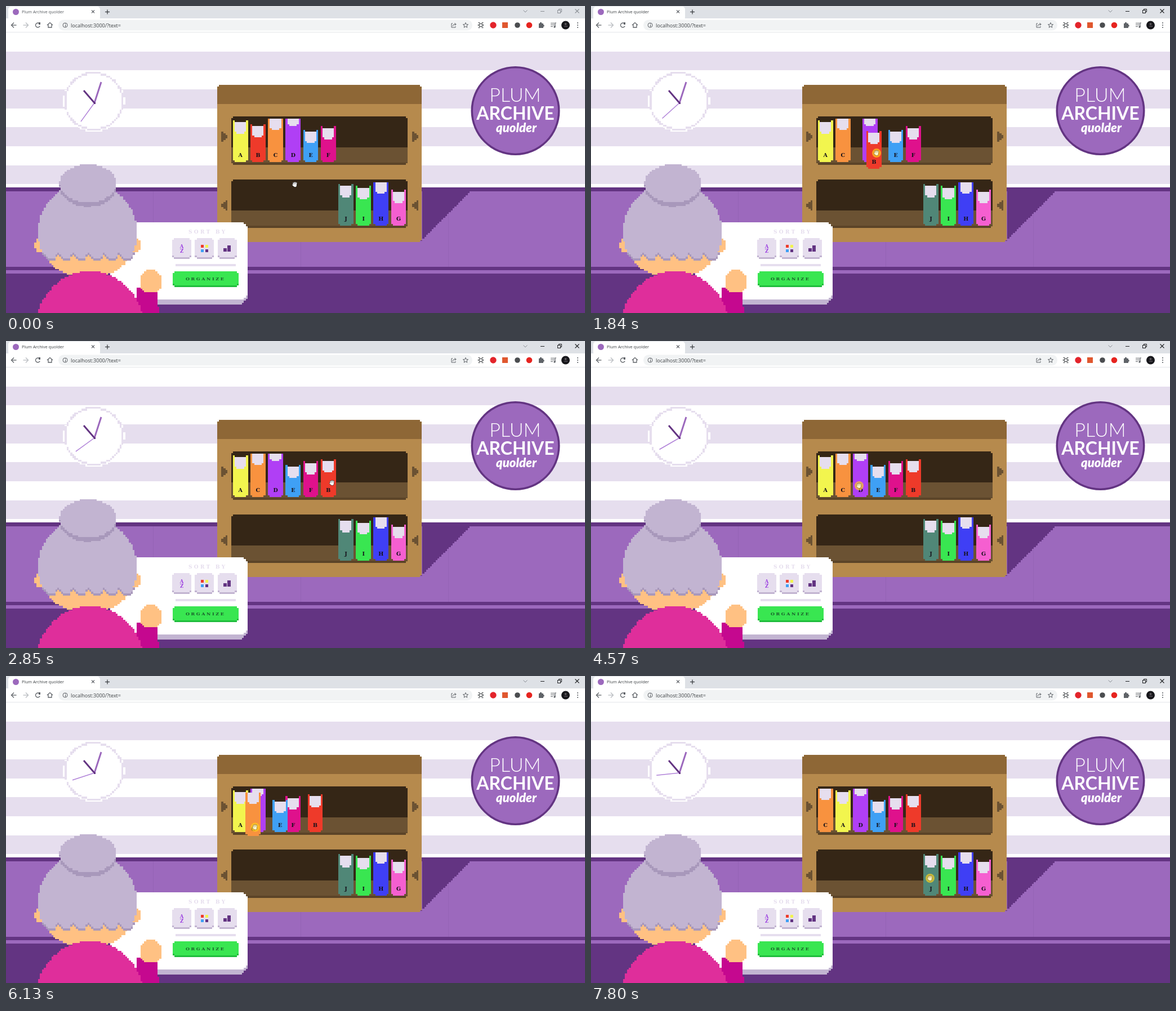
These frames come from a looping animation (1028 px wide and 545 px high, 8000 ms). An HTML page with a canvas:

```html
<!DOCTYPE html>
<html lang="en">
<head>
<meta charset="utf-8">
<title>Plum Archive quolder</title>
<style>
html, body { margin: 0; width: 100%; height: 100%; overflow: hidden; background: #fff; }
canvas { display: block; }
</style>
</head>
<body>
<canvas id="stage" width="1028" height="545"></canvas>
<script>
const LOOP = 8000, U = 3.36, PITCH = 31.2, TAU = Math.PI * 2;
const DARK = '#633482', PURPLE = '#9c69bd', LILAC = '#e6deee', GREY = '#c2b4d1', SHADE = '#a898bb', SKIN = '#ffc183';
const INK = '#5f6368', BLACK = '#33363a';
const SLAB = '"DejaVu Serif", serif', UI = '"Open Sans", sans-serif';

const stage = document.getElementById('stage').getContext('2d');
const backdrop = document.createElement('canvas');
backdrop.width = 1028;
backdrop.height = 545;
let g = backdrop.getContext('2d');

// ---- drawing helpers ----
function rect(x, y, w, h, color) {
  const l = Math.round(x), t = Math.round(y);
  g.fillStyle = color;
  g.fillRect(l, t, Math.round(x + w) - l, Math.round(y + h) - t);
}
function stepped(x, y, w, h, color, steps = 1) {
  for (let i = 0; i <= steps; i++) {
    const dx = i * U, dy = (steps - i) * U;
    rect(x + dx, y + dy, w - 2 * dx, h - 2 * dy, color);
  }
}
function rows(y0, y1, span, color) {
  const snap = v => Math.round(v / U) * U;
  for (let y = y0; y < y1 - 0.1; y += U) {
    const [l, r] = span(y + U / 2).map(snap);
    rect(l, y, r - l, Math.min(U, y1 - y), color);
  }
}
function oval(cx, cy, rx, ry, color, bottom = cy + ry) {
  rows(cy - ry, bottom, y => {
    const d = rx * Math.sqrt(Math.max(0, 1 - ((y - cy) / ry) ** 2));
    return [cx - d, cx + d];
  }, color);
}
function line(color, width, ...pts) {
  g.strokeStyle = color;
  g.lineWidth = width;
  g.beginPath();
  pts.forEach(([x, y]) => g.lineTo(x, y));
  g.stroke();
}
function frameBox(x, y, size, color) {
  g.strokeStyle = color;
  g.lineWidth = 1;
  g.strokeRect(x, y, size, size);
}
function cross(x, y, r, color) {
  line(color, 1.1, [x - r, y - r], [x + r, y + r]);
  line(color, 1.1, [x + r, y - r], [x - r, y + r]);
}
function disc(x, y, r, color) {
  g.fillStyle = color;
  g.beginPath();
  g.arc(x, y, r, 0, TAU);
  g.fill();
}
function arc(x, y, r, a, b, color, width) {
  g.strokeStyle = color;
  g.lineWidth = width;
  g.beginPath();
  g.arc(x, y, r, a, b);
  g.stroke();
}
function pill(x, y, w, h, r, color) {
  g.fillStyle = color;
  g.beginPath();
  g.roundRect(x, y, w, h, r);
  g.fill();
}
function text(s, x, y, font, color, align = 'left', spacing = 0) {
  g.font = font;
  g.fillStyle = color;
  g.textAlign = align;
  g.letterSpacing = spacing + 'px';
  g.fillText(s, x, y);
  g.letterSpacing = '0px';
}

// ---- timing helpers ----
const clamp = p => Math.max(0, Math.min(1, p));
const smooth = p => p * p * (3 - 2 * p);
const ramp = (t, from, duration) => clamp((t - from) / duration);

// ---- static scene ----
function room() {
  const stripe = 33.65;
  rect(0, 46, 1028, 499, '#fff');
  for (let i = 1; i < 8; i += 2) rect(0, 47 + i * stripe, 1028, stripe, LILAC);
  rect(0, 322, 1028, 223, DARK);
  rect(0, 329, 1028, 134, PURPLE);
  rect(0, 469, 1028, 6, PURPLE);
  for (let x = 261; x < 800; x += 262) rect(x, 329, 1, 134, '#9463b5');
  rows(329, 417, y => [738, 738 + 417 - y], DARK);
}

function clockFace() {
  oval(156, 169, 54.5, 54, '#fff');
  oval(156, 169, 53, 52, LILAC);
  oval(156, 169, 50, 48.7, '#fff');
  line(PURPLE, 3, [157, 172], [169, 135]);
  line(DARK, 3, [157, 172], [138, 150]);
}

function arrow(x, y, dir) {
  for (let i = 0; i < 3; i++) {
    const h = 18 - i * 6;
    rect(x + dir * (i - 1) * 3.6, y - h / 2, 3.6, h, '#6b5233');
  }
}

function bookcase() {
  const wood = '#b68a4d';
  stepped(375, 140, 363, 279, wood);
  stepped(375, 140, 363, 37, '#8e6736');
  rect(378, 174, 357, 4, wood);
  for (const y of [196, 308]) {
    stepped(400, y, 313, 86, '#5b4428');
    stepped(400, y, 313, 60, '#352616');
    rect(400, y + 55, 313, 27, '#6b5233');
  }
  for (const x of [386, 725]) {
    arrow(x, 232, 1);
    arrow(x, 354, -1);
  }
}

function sign() {
  disc(904.5, 186, 79, DARK);
  disc(904.5, 186, 75.5, PURPLE);
  text('PLUM', 904, 170, '300 34px Lato, sans-serif', '#fff', 'center');
  text('ARCHIVE', 904.5, 202, 'bold 32px Lato, sans-serif', '#fff', 'center');
  text('quolder', 906, 224, 'italic 900 22px Lato, sans-serif', '#fff', 'center');
}

function panel() {
  stepped(185, 390, 244, 140, GREY, 3);
  stepped(185, 384, 244, 137, '#fff', 2);
  text('SORT BY', 324, 403.5, 'bold 9px ' + SLAB, LILAC, 'left', 3.3);
  for (let i = 0; i < 3; i++) {
    stepped(295 + i * 40.3, 415, 34, 34, GREY);
    stepped(295 + i * 40.3, 412, 34, 34, LILAC);
  }
  [...'AZ'].forEach((c, i) => text(c, 312, 430 + 8 * i, 'bold 8.5px ' + SLAB, '#9b3fe0', 'center'));
  ['#ee3a2a', '#f2f54e', '#3fa0f5', DARK].forEach((c, i) =>
    rect(345.5 + 8 * (i % 2), 424 + 8 * (i >> 1), 5, 5, c));
  rect(386, 430, 6, 6, DARK);
  rect(393, 425, 6, 11, DARK);
  rect(301, 458, 107, 3.5, LILAC);
  stepped(296, 474, 117, 25, '#20bd3d');
  stepped(296, 471, 117, 25, '#39e651');
  text('ORGANIZE', 319, 486.5, 'bold 8px ' + SLAB, '#1a5a2a', 'left', 2.6);
}

function librarian() {
  for (const x of [60, 231]) oval(x, 425, 9, 12, SKIN);
  oval(145.5, 437, 74, 44, SKIN);
  oval(145, 402, 88, 88, GREY, 440);
  for (let x = 64; x < 226; x += U) {
    const wave = Math.abs(Math.sin(Math.PI * (x - 64) / 27));
    const hem = 442 + Math.round(3.5 * wave) * U;
    rect(x, 437, U, hem - 437, SHADE);
    rect(x, 437, U, hem - 441, GREY);
  }
  oval(145.5, 319, 50, 38, SHADE);
  oval(145.5, 315, 50, 34, GREY);
  rows(500, 545, y => [233, 267 + (y - 500) / 10], '#c5088f');
  oval(149, 572, 96, 101, '#df2e9b', 545);
  oval(257, 489, 20, 21, SKIN);
}

function browserArrow(x, dir, color) {
  line(color, 1.3, [x - 4.5, 34], [x + 4.5, 34]);
  line(color, 1.3, [x, 29.5], [x - 4.5 * dir, 34], [x, 38.5]);
}

function star(cx, cy) {
  const pts = Array.from({ length: 11 }, (_, i) => {
    const a = i * Math.PI / 5 - Math.PI / 2, r = i % 2 ? 2.1 : 4.8;
    return [cx + r * Math.cos(a), cy + r * Math.sin(a)];
  });
  line(INK, 1, ...pts);
}

function addressBar() {
  browserArrow(14, 1, INK);
  browserArrow(35, -1, '#b9bcc0');
  arc(56.5, 34, 4, 0.4, 5.4, INK, 1.3);
  rect(58, 29, 3, 4, INK);
  line(INK, 1.3, [73, 34], [78, 29.5], [83, 34]);
  line(INK, 1.3, [75, 33], [75, 38], [81, 38], [81, 33]);
  pill(93, 24.5, 735, 19, 9.5, '#f1f3f4');
  arc(105, 34, 4, 0, TAU, INK, 1);
  rect(104.5, 33, 1, 4, INK);
  rect(104.5, 31, 1, 1, INK);
  text('localhost:3000/?text=', 115, 37.5, '9px ' + UI, '#3c4043');
  line(INK, 1, [793, 31], [791, 31], [791, 38], [798, 38], [798, 36]);
  line(INK, 1, [793, 36], [795, 32.5], [799, 32.5]);
  line(INK, 1, [796.5, 30], [799, 32.5], [796.5, 35]);
  star(816, 34.3);
}

function extensions() {
  g.setLineDash([3, 3]);
  frameBox(838.5, 29.5, 9, BLACK);
  g.setLineDash([]);
  frameBox(840.5, 31.5, 5, BLACK);
  disc(865, 34, 5.7, '#e3242b');
  rect(881, 29, 10, 10, '#e0572f');
  disc(908, 34, 4.8, '#4b4d50');
  disc(929, 34, 5.3, '#e62420');
  rect(946, 31, 8, 8, INK);
  disc(949.5, 30.5, 1.8, INK);
  disc(954, 35, 1.8, INK);
  for (let i = 0; i < 3; i++) {
    rect(967, 30 + 3 * i, i < 2 ? 7 : 4, 1, INK);
    disc(1015, 30 + 4 * i, 1.1, INK);
  }
  line(INK, 1.2, [977, 30], [975, 30], [975, 37]);
  disc(974, 37, 1.7, INK);
  disc(993.5, 34, 7.5, '#17171b');
  disc(993.5, 32, 2, '#5a565a');
  rect(990.5, 35, 6, 2, '#454148');
}

function browser() {
  rect(0, 0, 1028, 22, '#dee1e6');
  rect(0, 22, 1028, 24, '#fff');
  rect(0, 46, 1028, 1, '#e4e6e9');
  pill(4, 1, 163, 24, 5, '#fff');
  disc(17.5, 10.5, 5.5, PURPLE);
  cross(154.5, 10, 2.5, INK);
  line(BLACK, 1.2, [176, 10.5], [184, 10.5]);
  line(BLACK, 1.2, [180, 6.5], [180, 14.5]);
  addressBar();
  extensions();
}

// ---- moving parts ----
function windowControls(active) {
  const c = active ? '#202124' : '#8b8f95';
  text('Plum Archive quolder', 28, 13, '7.5px ' + UI, active ? '#3c4043' : '#55595e');
  line('#8b8f95', 1, [918.5, 7.5], [922, 11], [925.5, 7.5]);
  rect(949, 9, 7, 1, c);
  frameBox(979.5, 7.5, 5, c);
  line(c, 1, [981.5, 7], [981.5, 5.5], [986.5, 5.5], [986.5, 10.5], [985, 10.5]);
  cross(1014, 9, 3.5, c);
}

function secondHand(t) {
  const a = (36 + Math.floor((t + 395) / 1000)) * TAU / 60;
  line('#b082d8', 1.5, [157, 172], [157 + 41 * Math.sin(a), 172 - 41 * Math.cos(a)]);
  rect(155.5, 170.5, 3, 3, DARK);
}

// Each glide leads on from where the one before it ended; sag bows it downward.
const glides = [
  { from: 310, to: 910, x: 452, y: 249 },
  { from: 1290, to: 2500, x: 579, y: 252, sag: 11 },
  { from: 2910, to: 3610, x: 474, y: 245 },
  { from: 3940, to: 4570, x: 476, y: 257, sag: 15 },
  { from: 4830, to: 5510, x: 460, y: 258 },
  { from: 5990, to: 6280, x: 423, y: 257, sag: 11 },
  { from: 7000, to: 7650, x: 602, y: 359 }
];
const presses = [[1180, 2550], [3740, 4900], [5670, 6790], [7650, LOOP]];
const drags = [
  { name: 'B', from: 1250, to: 2550, x: 452, y: 249 },
  { name: 'C', from: 6060, to: 6820, x: 451, y: 261 }
];

function cursorAt(t) {
  let x = 513, y = 317;
  for (const m of glides) {
    const p = smooth(ramp(t, m.from, m.to - m.from));
    x += (m.x - x) * p;
    y += (m.y - y) * p + (m.sag || 0) * Math.sin(Math.PI * p);
  }
  return { x, y };
}

// Heights are in pixel units; the tallest books are cut off by the shelf.
const FIRST = 'ABCDEFJIHG', SECOND = 'ACDEFBJIHG', TALLEST = 23;
const books = [
  ['J', '#508777', 22], ['I', '#39e651', 21], ['H', '#3f3ff5', 24], ['G', '#f55fd0', 19], ['F', '#df118c', 19],
  ['E', '#3fa0f5', 17], ['D', '#b03ff5', 26], ['C', '#f8923f', 24], ['B', '#ee3a2a', 20], ['A', '#f2f54e', 22]
].map(([name, color, height]) => ({ name, color, height }));

function slotOf(name, t, cursor) {
  const [b, c] = drags;
  if (t < b.to) {
    const i = FIRST.indexOf(name);
    if (t < b.from || i < 2 || i > 5) return i;
    const held = 1 + (cursor.x - b.x) / PITCH;
    return i - clamp((held - i + 0.47) * 2);
  }
  const i = SECOND.indexOf(name);
  if (i > 5) return i;
  if (name === 'C') return t < c.to ? 1 : 0;
  // The gap closes when C is lifted and reopens for its new place; D and F run out of step.
  const odd = name === 'D' || name === 'F';
  const close = i > 1 ? ramp(t, odd ? 5990 : 6020, odd ? 120 : 150) : 0;
  return i - close + ramp(t, odd ? 7000 : 6400, 200);
}

function drawBook({ name, color, height }, t, cursor, drag) {
  const dx = drag ? cursor.x - drag.x : 0, dy = drag ? cursor.y - drag.y : 0;
  const x = 402.7 + slotOf(name, t, cursor) * PITCH + dx;
  const floor = (FIRST.indexOf(name) > 5 ? 390 : 277) + dy;
  const top = floor - Math.min(height, TALLEST) * U;
  const label = floor - Math.min(height - 1, TALLEST) * U, labelEnd = floor - (height - 7) * U;
  for (const side of [0, 7]) rect(x + side * U, top, U, label - top, color);
  rect(x, label, 8 * U, floor - label - U, color);
  rect(x + U, floor - U, 6 * U, U, color);
  rect(x + U, label, 6 * U, labelEnd - label - U, LILAC);
  rect(x + 2 * U, labelEnd - U, 4 * U, U, LILAC);
  text(name, x + 13.5, floor - 9.5, 'bold 9.5px ' + SLAB, '#15101a', 'center');
}

function drawCursor({ x, y }, pressed) {
  if (pressed) disc(x, y, 8, 'rgba(255, 208, 30, .68)');
  const outline = pressed ? '#7a6420' : '#222', fill = pressed ? '#fff6c8' : '#fff';
  g.lineCap = 'round';
  for (const [color, extra] of [[outline, 1], [fill, 0]]) {
    for (let i = 0; i < 4; i++) {
      const spread = 1.9 * (i - 1.55);
      line(color, 1.4 + extra, [x + spread * 0.8, y + 1], [x + spread, y - 4 + 0.5 * (i - 1.6) ** 2]);
    }
    line(color, 1.4 + extra, [x - 2, y + 2.5], [x - 4, y + 0.5]);
    disc(x + 0.3, y + 1.7, 2.5 + extra / 2, color);
  }
  g.lineCap = 'butt';
}

[room, clockFace, bookcase, sign, browser, panel, librarian].forEach(draw => draw());
g = stage;

function frame(now) {
  const t = now % LOOP, cursor = cursorAt(t);
  const drag = drags.find(d => t >= d.from && t < d.to);
  const isHeld = book => Boolean(drag && book.name === drag.name);
  g.drawImage(backdrop, 0, 0);
  windowControls(t >= 70);
  secondHand(t);
  books.filter(book => !isHeld(book)).forEach(book => drawBook(book, t, cursor));
  books.filter(isHeld).forEach(book => drawBook(book, t, cursor, drag));
  drawCursor(cursor, presses.some(([from, to]) => t >= from && t < to));
  requestAnimationFrame(later => frame(Math.max(0, later - start)));
}
const start = performance.now();
frame(0);
</script>
</body>
</html>
```
